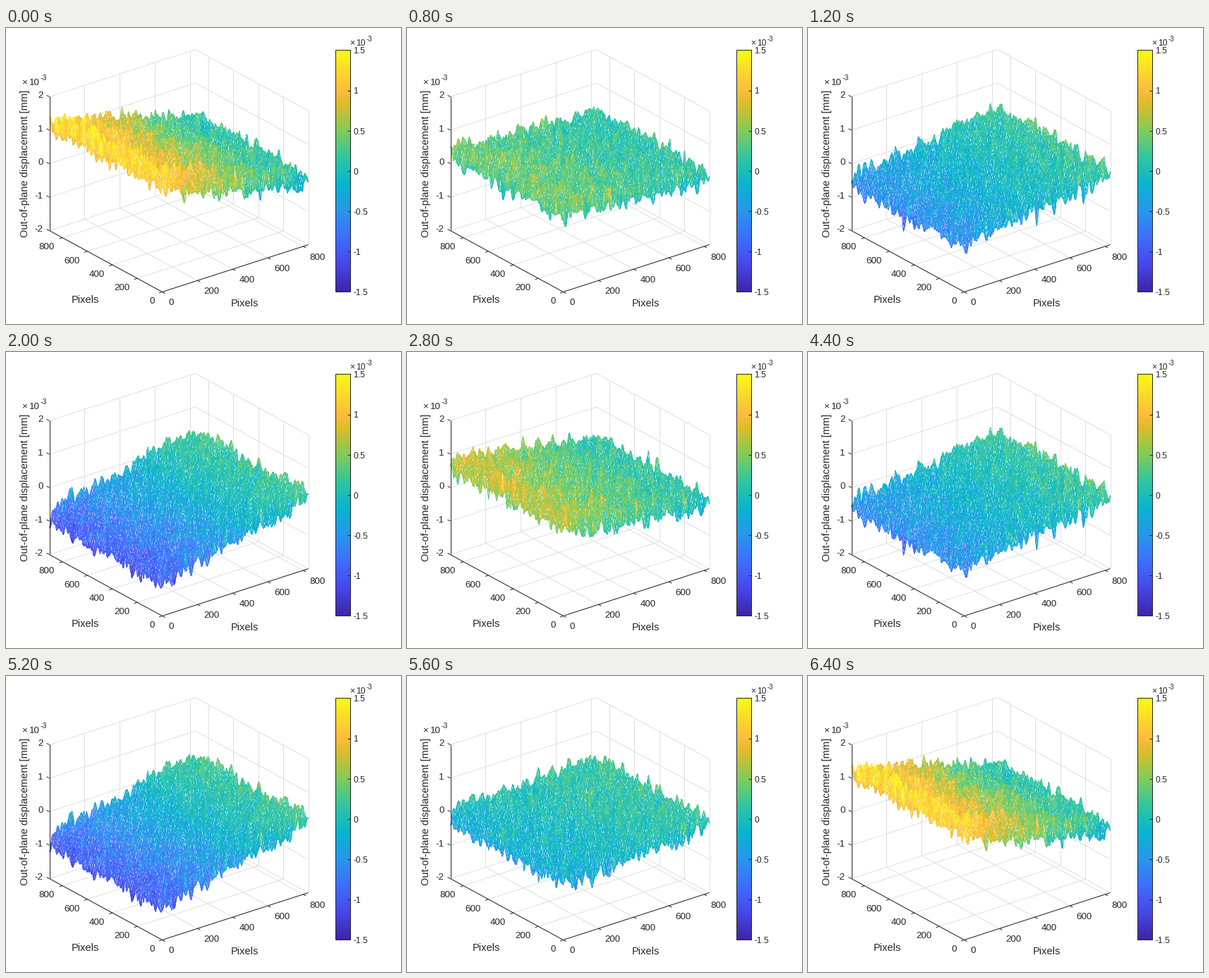
A matplotlib script for the animation above (6800 ms loop, 560 px wide and 420 px high).

```python
import numpy as np
import matplotlib.pyplot as plt
from matplotlib.animation import FuncAnimation
from matplotlib.collections import LineCollection, PolyCollection
from matplotlib.colors import LinearSegmentedColormap

W, H, DPI = 560, 420, 100
PX = 72 / DPI
INK, GRID = "#262626", "#dfdfdf"
FONT = "Liberation Sans"
XMAX, YMAX = 829, 905
N = 170
STEPS = 8  # pictures per vibration cycle

hues = ("#3e26a8 #4747eb #3e6fff #2797eb #08b5d0 "
        "#31c69f #81cc59 #dcbd29 #fccf30 #f9fb15").split()
stops = [(k / 9, hue) for k, hue in enumerate(hues)] + [(.83, "#fdbb3d")]
cmap = LinearSegmentedColormap.from_list("heat", sorted(stops), 256)


def project(u, v, z):
    """Unit floor coordinates and height to stage pixels."""
    return 222 + 207 * u - 160 * v, 374 - 67 * u - 87 * v - 47.5 * (z + 2)


fig = plt.figure(figsize=(W / DPI, H / DPI), dpi=DPI, facecolor="white")
ax = fig.add_axes([0, 0, 1, 1])
ax.axis("off")


def lines(segs, color, z):
    ax.add_collection(LineCollection(segs, colors=color, linewidths=PX, zorder=z))


def text(x, y, s, size, ha="left"):
    ax.text(x, y + .36 * size, s, fontsize=size * PX, ha=ha, va="baseline",
            color=INK, family=FONT)


def exponent(x, y, size):
    text(x, y, "×", size)
    text(x + .8 * size, y, "10", size)
    text(x + 1.96 * size, y - .45 * size, "-3", size * .8)


def seg(a, b):
    return [project(*a), project(*b)]


def tick(p, dx, dy):
    return [p, (p[0] + dx, p[1] + dy)]


# Box, grid and tick labels
grid = []
axes = [seg((0, 0, -2), (1, 0, -2)), seg((0, 0, -2), (0, 1, -2)),
        seg((0, 1, -2), (0, 1, 2))]
for value in range(0, 801, 200):
    u, v = value / XMAX, value / YMAX
    grid += [seg((u, 0, -2), (u, 1, -2)), seg((u, 1, -2), (u, 1, 2)),
             seg((0, v, -2), (1, v, -2)), seg((1, v, -2), (1, v, 2))]
    px, py = project(u, 0, -2), project(0, v, -2)
    axes += [tick(px, 4, 2), tick(py, -4.5, 1.5)]
    text(px[0] + 9, px[1] + 14, str(value), 13.33)
    text(py[0] - 11, py[1] + 12, str(value), 13.33, "right")
for z in range(-2, 3):
    grid += [seg((0, 1, z), (1, 1, z)), seg((1, 1, z), (1, 0, z))]
    p = project(0, 1, z)
    axes.append(tick(p, -4, -2))
    text(53, p[1] - 3, str(z), 13.33, "right")
lines(grid, GRID, 1)
lines(axes, INK, 4)

text(112.5, 384, "Pixels", 14.67, "center")
text(338.5, 389, "Pixels", 14.67, "center")
ax.text(32, 191.5, "Out-of-plane displacement [mm]", fontsize=14.67 * PX,
        rotation=90, rotation_mode="anchor", ha="center", va="baseline",
        color=INK, family=FONT)
exponent(22.5, 75.5, 13.33)
exponent(487.5, 20, 12)

# Colour scale
ax.imshow(np.linspace(1, 0, 256)[:, None], cmap=cmap, aspect="auto",
          extent=(467, 488, 374, 31), zorder=2)
ax.add_patch(plt.Rectangle((467, 31), 21, 343, fill=False, ec=INK, lw=PX, zorder=4))
for k in range(-3, 4):
    y = 202.5 - k * 343 / 6
    lines([[(484, y), (488, y)]], INK, 4)
    text(493, y + .5, f"{k / 2:g}", 12)
ax.set_xlim(.5, W + .5)
ax.set_ylim(H - .5, -.5)

# Vibrating plate: tilt and speckle share one cycle as a complex amplitude
rng = np.random.default_rng(7)
u, v = np.meshgrid(np.linspace(0, 1, N), np.linspace(0, 1, N), indexing="ij")


def speckle():
    n = rng.standard_normal((N, N))
    for axis in (0, 1, 0, 1):
        n = (np.roll(n, 1, axis) + 2 * n + np.roll(n, -1, axis)) / 4
    return n / n.std()


rim = np.maximum(abs(2 * u - 1), abs(2 * v - 1)) ** 30
tilt = 1.24 * (1 - 1.5 * u + .4 * u ** 2) * np.exp(-1j * np.radians(16 - 6 * v))
amp = tilt + .16 * (1 + .15 * rim) * (speckle() + 1j * speckle())

mesh = PolyCollection([], facecolors="white", linewidths=PX, zorder=3,
                      joinstyle="round")
ax.add_collection(mesh)


def draw(i):
    z = .06 + np.real(amp * np.exp(2j * np.pi * (i % STEPS) / STEPS))
    p = np.stack(project(u, v, z), axis=-1)
    quads = np.stack([p[:-1, :-1], p[1:, :-1], p[1:, 1:], p[:-1, 1:]], axis=2)
    # far cells first, so near ones hide them
    mesh.set_verts(quads[::-1, ::-1].reshape(-1, 4, 2))
    level = z[:-1, :-1][::-1, ::-1].ravel()
    mesh.set_edgecolors(cmap((level + 1.5) / 3))
    return (mesh,)


anim = FuncAnimation(fig, draw, frames=17, interval=400, repeat=True,
                     repeat_delay=0, blit=False)
plt.show()
```
